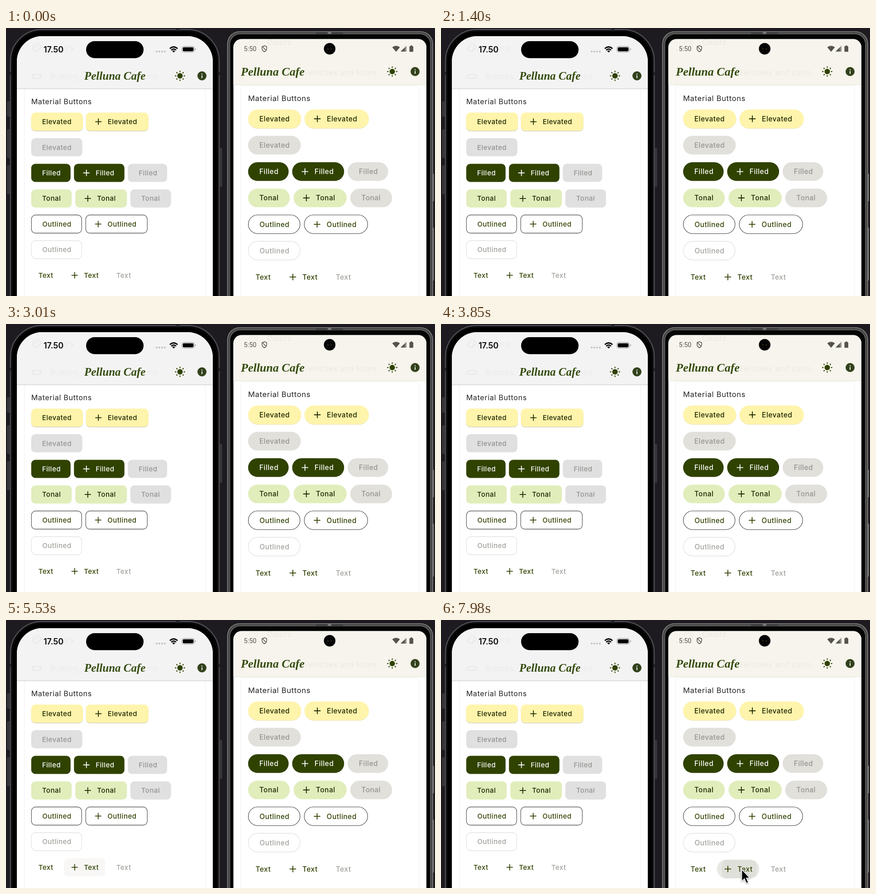
An HTML page that plays this animation: 948x591 px, repeating every 8000 ms.

```html
<!DOCTYPE html>
<html lang="en">
<head>
<meta charset="utf-8">
<style>
  html, body { margin: 0; width: 100%; height: 100%; overflow: hidden; background: #1d1a20; }
  svg { display: block; }
  text { font-family: Inter, sans-serif; }
  .label { font-size: 15px; font-weight: 500; letter-spacing: .5px; }
  .heading { font-size: 16px; letter-spacing: .7px; fill: #222; }
  .ghost { font-size: 16px; letter-spacing: .9px; }
  .title { font: italic bold 25px "Liberation Serif", serif; fill: #344b0e; }
</style>
</head>
<body>
<svg id="stage" width="948" height="591" viewBox="0 0 948 591"></svg>
<script>
const TICK = 70, LOOP = 8000, GREEN = '#304200', TINT = '#343010';
const stage = document.getElementById('stage');

const rect = (x, y, w, h, r, fill, more = '') =>
  `<rect x="${x}" y="${y}" width="${w}" height="${h}" rx="${r}" fill="${fill}" ${more}/>`;
const circle = (x, y, r, fill, more = '') =>
  `<circle cx="${x}" cy="${y}" r="${r}" fill="${fill}" ${more}/>`;
const path = (d, fill, more = '') => `<path d="${d}" fill="${fill}" ${more}/>`;
const text = (x, y, cls, str, more = '') => `<text x="${x}" y="${y}" class="${cls}" ${more}>${str}</text>`;
const at = (x, y, body, scale = 1) => `<g transform="translate(${x} ${y}) scale(${scale})">${body}</g>`;

const KINDS = {
  elevated: { fill: '#fff4ab', ink: '#1d2600' },
  filled: { fill: GREEN, ink: '#fff' },
  tonal: { fill: '#e1edbb', ink: '#1d2600' },
  outlined: { fill: 'none', ink: GREEN, line: '#42443c' },
  text: { fill: 'none', ink: GREEN },
  off: { ink: '#939390' },
  offOutlined: { fill: 'none', ink: '#a0a09c', line: '#dededc' },
  offText: { fill: 'none', ink: '#a0a09c' },
};

function button(phone, x, row, w, kind, label, plus) {
  const { fill = phone.off, ink, line } = KINDS[kind];
  const y = row * 56.45, pill = phone.radius;
  const flat = kind === 'text' || kind === 'offText';
  const pad = flat ? (plus ? 44 : 16) : (plus ? 48 : 24);
  const px = x + pad - 20.5, py = y + 20;
  let out = '';
  if (kind === 'elevated') out += rect(x, y + 1.2, w, 40, pill, phone.shadow);
  out += rect(x, y, w, 40, pill, fill, line ? `stroke="${line}" stroke-width="1.1"` : '');
  if (plus) {
    out += rect(x, y, w, 40, pill, kind === 'filled' ? '#fff' : TINT, `id="${phone.name}-${kind}" opacity="0"`);
    if (phone.name === 'right' && kind === 'text')
      out += `<clipPath id="pill">${rect(x, y, w, 40, pill, '#000')}</clipPath>
        <g clip-path="url(#pill)">${circle(0, py, 0, TINT, 'id="ripple" opacity=".045"')}</g>`;
    out += path(`M${px - 7} ${py}h14m-7 -7v14`, 'none', `stroke="${ink}" stroke-width="1.8"`);
  }
  return out + text(x + pad, y + 25.5, 'label', label, `fill="${ink}"`);
}

function buttons(phone) {
  const b = (...args) => button(phone, ...args);
  return text(0, -18.6, 'heading', 'Material Buttons') +
    b(0, 0, 114, 'elevated', 'Elevated') + b(121, 0, 138, 'elevated', 'Elevated', true) +
    b(0, 1, 113, 'off', 'Elevated') +
    b(0, 2, 87, 'filled', 'Filled') + b(94.5, 2, 111.5, 'filled', 'Filled', true) +
    b(213.5, 2, 87, 'off', 'Filled') +
    b(0, 3, 89.5, 'tonal', 'Tonal') + b(97.5, 3, 114, 'tonal', 'Tonal', true) +
    b(219, 3, 90, 'off', 'Tonal') +
    b(.5, 4, 111, 'outlined', 'Outlined') + b(120.5, 4, 136, 'outlined', 'Outlined', true) +
    b(.5, 5, 111, 'offOutlined', 'Outlined') +
    b(0, 6, 64, 'text', 'Text') + b(72.5, 6, 91, 'text', 'Text', true) +
    b(172, 6, 64, 'offText', 'Text');
}

const sun = (x, y) => {
  let rays = '';
  for (let i = 0; i < 8; i++) rays += `<path d="M0 -11.2v3" transform="rotate(${i * 45})" stroke="${GREEN}" stroke-width="2.2"/>`;
  return at(x, y, circle(0, 0, 6, GREEN) + rays);
};
const info = (x, y, bg) => at(x, y, circle(0, 0, 10, '#33421c') + rect(-1, -1, 2, 6, 0, bg) + rect(-1, -5, 2, 2.2, 0, bg));
const palette = (x, y, color) => at(x, y,
  path('M0 -9A9 9 0 0 0 0 9C4 9 0 4 4 3C8 3 9 3 9 -1A9 8 0 0 0 0 -9', 'none', `stroke="${color}" stroke-width="1.6"`) +
  circle(-4, -1, 1.4, color) + circle(0, -4, 1.4, color) + circle(4, -2, 1.4, color));

function leftPhone() {
  let out = '';
  for (const [x, y, h] of [[3, 162, 33], [3, 224, 62], [3, 303, 63], [472, 265, 85]])
    out += rect(x, y, 5, h, 1.5, '#353338', 'stroke="#504e52" stroke-width=".7"');
  out += rect(10, 3.5, 461, 680, 69, '#000', 'stroke="#48464a" stroke-width="3"');
  out += rect(14, 7, 453, 680, 66, '#000', 'stroke="#1b1a1c"');
  out += rect(376, 2, 7, 4, 0, '#242326') + rect(8, 97, 4, 7, 0, '#242326') + rect(469, 97, 4, 7, 0, '#242326');
  out += `<clipPath id="leftScreen">${rect(24, 18, 433, 660, 56, '#000')}</clipPath><g clip-path="url(#leftScreen)">`;
  out += rect(24, 17, 433, 574, 0, '#fff') + path('M40.5 134V591M440.5 134V591', 'none', 'stroke="#efefef"');
  out += rect(24, 17, 433, 117, 0, '#f3f3f3') + rect(24, 133.5, 433, 1.3, 0, '#d0d0d0');
  out += palette(68, 43, '#e6e6e6') + text(97, 49, 'ghost', 'Colors', 'fill="#e8e8e8"');
  out += rect(59, 103, 18, 8, 1, 'none', 'stroke="#e6e6e6" stroke-width="1.6"');
  out += text(97, 112, 'ghost', 'Buttons, Switches and Icons', 'fill="#e9e9e9"') + '</g>';
  out += rect(81, 36, 48, 22, 4, '#f3f3f3') + rect(171, 92, 140, 28, 4, '#f3f3f3');
  out += rect(177, 29, 127, 37.5, 18.7, '#000');
  out += text(83, 54, '', '17.50', 'font-size="18" font-weight="600" fill="#080808"');
  for (let i = 0; i < 4; i++) out += circle(333 + i * 6, 52, 1.9, '#bcbcbc');
  out += path('M362 45.5Q370.5 38 379 45.5M365 48.8Q370.5 44 376 48.8', 'none', 'stroke="#000" stroke-width="2.7"') +
    path('M367.2 50.8Q370.5 48 373.8 50.8L370.5 54Z', '#000');
  out += rect(388.5, 40.5, 28, 13, 4, 'none', 'stroke="#999"') + rect(390.5, 42.5, 24, 9, 2.4, '#000') + rect(418, 45, 1.5, 4, .7, '#999');
  return out + text(173, 114, 'title', 'Pelluna Cafe') + sun(384.5, 105.5) + info(433, 105.5, '#f3f3f3');
}

function rightPhone() {
  const bg = '#f6f4ec';
  let out = rect(941, 321, 4.5, 61, 1.5, '#7b7a79') + rect(941, 440, 4.5, 117, 1.5, '#7b7a79');
  out += rect(489.5, 8, 453.5, 680, 27, '#464546', 'stroke="#858482" stroke-width="1.6"');
  out += rect(494.5, 13, 443.5, 680, 23, '#050505', 'stroke="#6d6c6b" stroke-width="1.4"');
  out += rect(685, 10, 60, 2.5, 1, '#303031') + rect(711, 9, 8, 4, 1, '#777');
  out += `<clipPath id="rightScreen">${rect(502.5, 24.5, 426.5, 660, 18, '#000')}</clipPath><g clip-path="url(#rightScreen)">`;
  out += rect(502, 24, 428, 567, 0, '#fff') + path('M518.5 127V591M913.5 127V591M518 127.5H914', 'none', 'stroke="#f1f1ef"');
  out += rect(502, 24, 428, 101, 0, bg) + rect(502, 124.8, 428, 1, 0, '#e5e3db');
  out += palette(547, 31, '#edebe3') + text(577, 37, 'ghost', 'Colors', 'fill="#e8e6de"');
  out += text(820, 104, 'ghost', 'Buttons, Switches and Icons', 'fill="#eae8e0" text-anchor="end"') + '</g>';
  out += rect(517, 82, 145, 30, 4, bg) + rect(523, 36, 58, 20, 4, bg);
  out += text(525.5, 51, '', '5:50', 'style="font:14.5px Roboto,sans-serif" fill="#55554f"');
  out += path('M571 39L576 41V45.5Q576 50 571 52.5Q566 50 566 45.5V41ZM567 41L575 50', 'none', 'stroke="#55554f" stroke-width="1.5"');
  out += circle(715.2, 45.8, 12.8, '#050505') + circle(711.5, 46, 1.4, '#39331a') + circle(718.5, 46, 1.4, '#39331a');
  out += path('M853.5 42.5Q862 36 870.5 42.5L862 52.5Z', '#55554f');
  out += path('M885 39V52H872Z', '#8d8b85') + path('M881 43V52H872Z', '#55554f');
  out += rect(891.5, 40, 8.5, 12.5, 1.2, '#55554f') + rect(894, 38.5, 3.5, 2, 0, '#55554f');
  return out + text(519, 105, 'title', 'Pelluna Cafe', 'style="font-size:26px"') + sun(853.5, 96) + info(904, 96, bg);
}

const cursor = `<g id="cursor" style="filter:drop-shadow(0 1.5px 1.5px #0007)">
  ${path('M0 0V26L6 20.5L10.3 30.5L14.7 28.6L10.4 19H18Z', '#000', 'stroke="#fff" stroke-width="1.5"')}</g>`;

stage.innerHTML = rect(0, 0, 948, 591, 0, '#1d1a20') + leftPhone() + rightPhone() +
  at(55.7, 186.6, buttons({ name: 'left', radius: 9, off: '#e0e0e0', shadow: '#d2cdb5' })) +
  at(535, 179.7, buttons({ name: 'right', radius: 20, off: '#e1e0db', shadow: '#eee8c4' }), 1.03) + cursor;

// Each press fades in, holds and fades out; some show the pointer.
const presses = [
  { id: 'left-elevated', from: 910, to: 1400, tip: [230, 200], hide: 1400 },
  { id: 'left-filled', from: 2450, to: 2800, tip: [209, 312], hide: 3010 },
  { id: 'left-tonal', from: 3500, to: 3710 },
  { id: 'left-outlined', from: 4410, to: 5040, tip: [233, 438.5], hide: 5040 },
  { id: 'left-text', from: 5530, to: 6160 },
  { id: 'right-text', from: 7840, to: 9000, tip: [664.5, 550], show: 7560, hide: 9000 },
];
const $ = id => document.getElementById(id);
const clamp = v => Math.max(0, Math.min(1, v));

function draw(now) {
  const t = Math.floor((now % LOOP) / TICK) * TICK;
  let tip = null;
  for (const p of presses) {
    const fade = clamp(Math.min((t - p.from + TICK) / 210, (p.to - t) / 210));
    $(p.id).setAttribute('opacity', fade * (p.id === 'left-filled' ? .16 : .11));
    if (p.tip && t >= (p.show || p.from) && t < p.hide) tip = p.tip;
  }
  const spread = clamp((t - 7840 + TICK) / 210);
  $('ripple').setAttribute('r', spread * 38);
  $('ripple').setAttribute('cx', 125 - spread * 4.5);
  $('cursor').setAttribute('visibility', tip ? 'visible' : 'hidden');
  if (tip) $('cursor').setAttribute('transform', `translate(${tip})`);
  requestAnimationFrame(draw);
}
requestAnimationFrame(draw);
</script>
</body>
</html>
```
